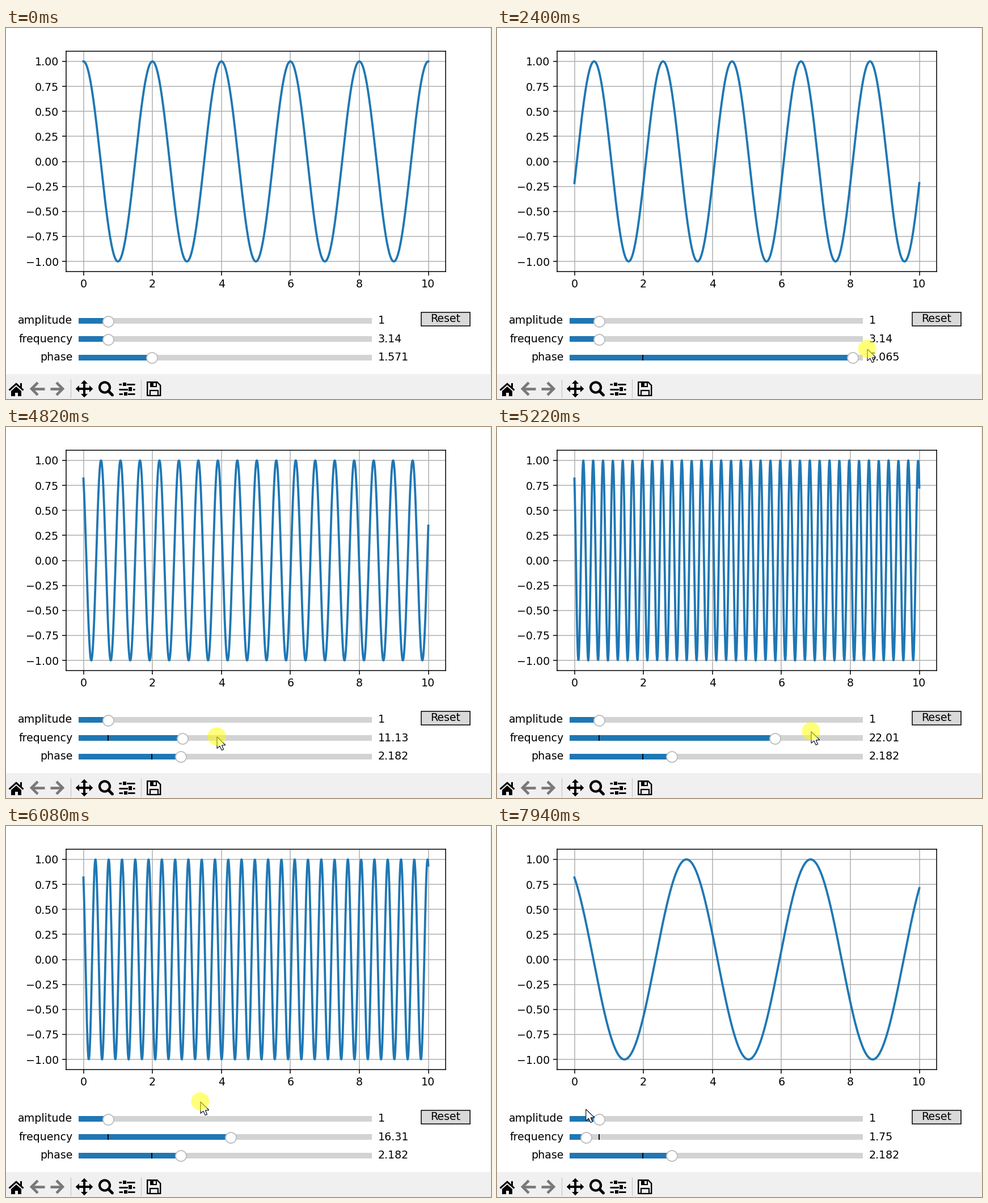
These frames come from a looping animation (855 by 655 pixels, 8000 ms). A matplotlib script:

```python
import numpy as np
import matplotlib.pyplot as plt
from matplotlib.animation import FuncAnimation
from matplotlib.patches import Circle, Polygon, Rectangle

W, H, DPI = 855, 655, 128
FRAMES, STEP = 160, 50
BLUE, TRACK, BAR, FAINT = "#1f77b4", "#d3d3d3", "#f0f0f0", "#787878"
PX = 72 / DPI      # points per pixel
UNIT = 1.9 * PX    # one point of the drawn window
FONT, THIN = 10 * UNIT, 0.8 * UNIT

plt.rcParams["font.family"] = "DejaVu Sans"
fig = plt.figure(figsize=(W / DPI, H / DPI), dpi=DPI, facecolor="white")

# ---- plot -------------------------------------------------------------
ax = fig.add_axes([106.1 / W, 1 - 429.8 / H, 668.8 / W, 388.5 / H])
ax.set(xlim=(-0.5, 10.5), ylim=(-1.1, 1.1))
ax.set_xticks(range(0, 11, 2))
ax.set_yticks(np.linspace(-1, 1, 9))
ax.yaxis.set_major_formatter("{x:.2f}")
ax.tick_params(labelsize=FONT, length=3.5 * UNIT, width=THIN, pad=3.5 * UNIT)
ax.grid(color="#b0b0b0", lw=THIN)
for spine in ax.spines.values():
    spine.set_linewidth(THIN)
xs = np.linspace(0, 10, 1000)
curve, = ax.plot(xs, np.cos(np.pi * xs), color=BLUE, lw=2 * UNIT)

# ---- pixel-space layer for widgets ------------------------------------
ui = fig.add_axes([0, 0, 1, 1], zorder=5)
ui.set(xlim=(0, W), ylim=(H, 0))
ui.axis("off")


def rect(x0, y0, x1, y1, color, z=1, **kw):
    kw.setdefault("lw", 0)
    return ui.add_patch(Rectangle((x0, y0), x1 - x0, y1 - y0, fc=color, zorder=z, **kw))


def poly(points, color="black", z=2, **kw):
    kw.setdefault("lw", 0)
    return ui.add_patch(Polygon(points, fc=color, zorder=z, **kw))


def stroke(points, width, color="black", z=2, cap="butt"):
    px, py = zip(*points)
    ui.plot(px, py, color=color, lw=width * PX, zorder=z,
            solid_capstyle=cap, solid_joinstyle="miter")


def label(x, y, text, ha):
    return ui.text(x, y, text, size=FONT, ha=ha, va="center", zorder=3)


class Slider:
    X0, X1 = 128, 645

    def __init__(self, name, y, top, start, digits):
        self.top, self.digits = top, digits
        rect(self.X0, y - 5, self.X1, y + 5, TRACK)
        self.fill = rect(self.X0, y - 5, self.X1, y + 5, BLUE, 2)
        mark = self.pos(start)
        stroke([(mark, y - 5), (mark, y + 5)], 1.9, z=3)
        self.knob, = ui.plot([mark], [y + 0.8], "o", ms=10 * UNIT, mfc="white",
                             mec="#bfbfbf", mew=UNIT, zorder=4)
        label(117.5, y, name, "right")
        self.text = label(655.7, y, "", "left")
        self.set(start)

    def pos(self, value):
        return self.X0 + (self.X1 - self.X0) * value / self.top

    def set(self, value):
        value = min(max(value, 0), self.top)
        x = self.pos(value)
        self.fill.set_width(x - self.X0)
        self.knob.set_xdata([x])
        self.text.set_text(f"{value:.{self.digits}f}")
        return value


amp = Slider("amplitude", 517, 10, 1, 0)
freq = Slider("frequency", 549.3, 10 * np.pi, np.pi, 2)
phase = Slider("phase", 581.6, 2 * np.pi, np.pi / 2, 3)

rect(732, 502, 818, 526, "#d9d9d9", ec="black", lw=THIN)
label(775, 513.5, "Reset", "center")

# ---- toolbar ----------------------------------------------------------
rect(0, 611, W, H, BAR)
rect(854, 0, 855, 611, "#e4e4e4")
for x in (113.5, 237.5):
    stroke([(x, 620), (x, 653)], 1.2, "#c6c6c6")

# home
stroke([(5.5, 639.5), (18, 628.3), (30.5, 639.5)], 3)
rect(24.5, 627, 28, 635, "black")
poly([(9, 641), (18, 633), (27, 641), (27, 650), (9, 650)])
rect(15.5, 643.5, 20.5, 650, BAR, 3)

# back and forward
for cx, d in ((55, 1), (90, -1)):
    stroke([(cx + d, 626), (cx - 10 * d, 637), (cx + d, 648)], 4.6, FAINT)
    stroke([(cx - 9 * d, 637), (cx + 12.5 * d, 637)], 4.6, FAINT)

# pan
for dx, dy in ((1, 0), (-1, 0), (0, 1), (0, -1)):
    stroke([(138, 637), (138 + 11 * dx, 637 + 11 * dy)], 4)
    poly([(138 + a * dx + b * dy, 637 + a * dy + b * dx)
          for a, b in ((15.3, 0), (9, 6), (9, -6))])

# zoom
ui.add_patch(Circle((174, 634.5), 9, fill=False, ec="black", lw=4.2 * PX, zorder=2))
stroke([(180.5, 641), (187.5, 648)], 5, cap="round")

# subplot settings
for y, knob in ((629, 208.5), (637.5, 219), (646, 210.5)):
    stroke([(199, y), (227, y)], 2.8)
    rect(knob - 4.5, y - 3.2, knob + 4.5, y + 3.2, BAR, 3)
    rect(knob - 3, y - 3.2, knob + 3, y + 3.2, "black", 4)

# save
poly([(249.2, 625.2), (266.5, 625.2), (272.2, 631), (272.2, 648.8), (249.2, 648.8)],
     BAR, ec="black", lw=2.4 * PX)
rect(254, 625, 266, 634, "black", 3)
rect(260, 626.5, 263.5, 632, BAR, 4)
rect(254.2, 640, 267.5, 648.8, BAR, 3, ec="black", lw=2.2 * PX)

# ---- pointer ----------------------------------------------------------
ARROW = np.array([(0, 0), (0, 20.5), (4.8, 16.2), (8.3, 23.6), (11.6, 22.2),
                  (8.4, 15), (14.8, 14.6)])
arrow = poly(ARROW, "white", 10, ec="#101820", lw=1.2 * PX)
glow = ui.add_patch(Circle((0, 0), 16, fc="#ffff00", alpha=0.52, lw=0, zorder=11))


# ---- motion -----------------------------------------------------------
def track(*keys):
    """Smooth monotone curve through (time, value) keys."""
    ts, vs = np.array(keys, float).T
    sec = np.diff(vs) / np.diff(ts)
    a, b = sec[:-1], sec[1:]
    same = a * b > 0
    tan = np.zeros_like(vs)
    tan[1:-1] = np.where(same, 2 * a * b / np.where(same, a + b, 1), 0)

    def at(t):
        t = np.clip(t, ts[0], ts[-1])
        i = min(np.searchsorted(ts, t, side="right") - 1, len(ts) - 2)
        h = ts[i + 1] - ts[i]
        u = (t - ts[i]) / h
        return ((1 + 2 * u) * (1 - u) ** 2 * vs[i] + u * (1 - u) ** 2 * h * tan[i]
                + u * u * (3 - 2 * u) * vs[i + 1] + u * u * (u - 1) * h * tan[i + 1])
    return at


LEAD = 150                  # the sliders trail the pointer by this many ms
PAUSE, PAUSE_MS = 6070, 190
phase_at = track((1700, np.pi / 2), (1950, 1.0), (2420, 6.065), (2570, 6.38),
                 (3000, 0.72), (3280, 2.182))
freq_at = track((4400, np.pi), (4820, 11.127), (5570, 29.235), (5650, 29.7),
                (PAUSE, 16.31), (6830, 3.273), (7200, 0.75), (7600, 1.746))
entry = track((200, 380), (760, -45), (1260, 0))
hop = track((3500, 0), (4070, 1))
height = track((200, 648), (760, 552), (1260, 580), (2420, 567), (3280, 560),
               (3500, 560), (4070, 549), (4820, 547), (5570, 523), (PAUSE, 487),
               (6830, 500))


def pointer(t):
    x0 = phase.pos(phase_at(t + LEAD)) + entry(t)
    x1 = freq.pos(freq_at(t + LEAD))
    return np.array([x0 + hop(t) * (x1 - x0), height(t)])


def draw(i):
    t = i * STEP + 20
    t -= np.clip(t - PAUSE, 0, PAUSE_MS)
    f, p = freq.set(freq_at(t)), phase.set(phase_at(t))
    curve.set_ydata(np.sin(f * xs + p))
    tip = pointer(t)
    arrow.set_xy(ARROW + tip)
    arrow.set_visible(t >= 200)
    glow.center = tip - (0.5, 0.8)
    glow.set_visible(1400 <= t < 3270 or 4270 <= t < 7690)
    return curve, arrow, glow


anim = FuncAnimation(fig, draw, frames=FRAMES, interval=STEP, repeat=True,
                     repeat_delay=0, blit=False)
plt.show()
```
